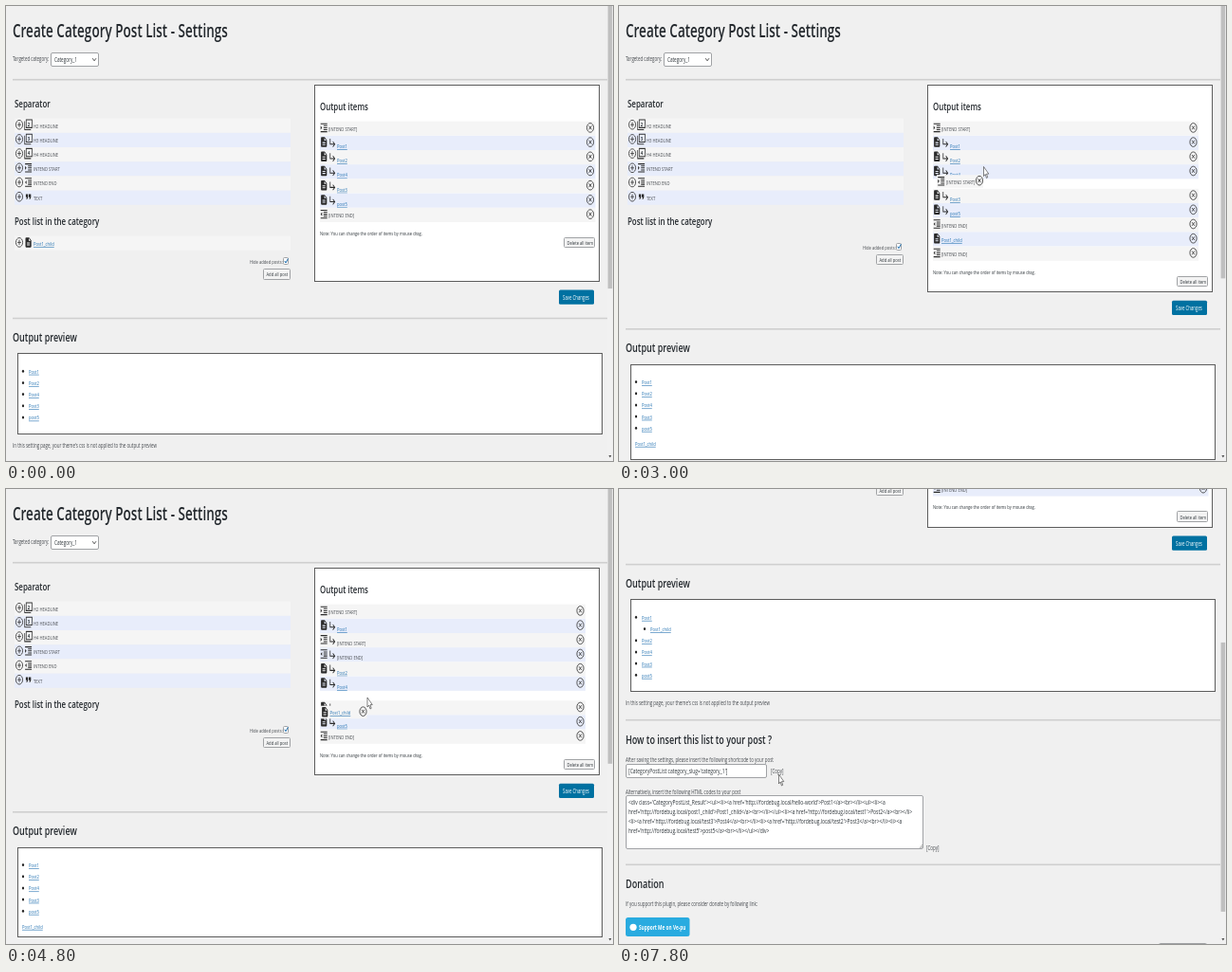
Recreate the animation shown at these times as an HTML page. Size 640x480 px, loop 8 s.

```html
<!DOCTYPE html>
<html lang="en">
<head>
<meta charset="utf-8">
<title>Settings</title>
<style>
html, body { margin: 0; width: 100%; height: 100%; overflow: hidden; background: #f0f0f0; }
svg { display: block; width: 640px; height: 480px; }
text { font-family: "Open Sans", "Noto Sans", sans-serif; fill: #464a4f; white-space: pre; }
.h { font-weight: 600; fill: #23282d; }
.a { fill: #2271b1; text-decoration: underline; }
.w { fill: #fff; }
.b { font-weight: 700; }
.d { fill: #2c3338; }
</style>
</head>
<body>
<svg id="stage" viewBox="0 0 640 480">
  <defs>
    <symbol id="in" viewBox="0 0 24 24" preserveAspectRatio="none"><path d="M3 21h18v-2H3zM3 8v8l4-4zM11 17h10v-2H11zM3 3v2h18V3zM11 9h10V7H11zM11 13h10v-2H11z"/></symbol>
    <symbol id="out" viewBox="0 0 24 24" preserveAspectRatio="none"><path d="M3 21h18v-2H3zM7 8v8l-4-4zM11 17h10v-2H11zM3 3v2h18V3zM11 9h10V7H11zM11 13h10v-2H11z"/></symbol>
    <symbol id="file" viewBox="0 0 24 24" preserveAspectRatio="none"><path fill-rule="evenodd" d="M14 2H6a2 2 0 0 0-2 2v16a2 2 0 0 0 2 2h12a2 2 0 0 0 2-2V8zM16 18H8v-2h8zM16 14H8v-2h8zM13 9V3.5L18.5 9z"/></symbol>
    <symbol id="quote" viewBox="0 0 24 24" preserveAspectRatio="none"><path d="M6 17h3l2-4V7H5v6h3zM14 17h3l2-4V7h-6v6h3z"/></symbol>
    <symbol id="sub" viewBox="0 0 24 24" preserveAspectRatio="none"><path d="M19 15l-6 6-1.4-1.4L15.2 16H4V4h2v10h9.2l-3.6-3.6L13 9z"/></symbol>
    <symbol id="pages" viewBox="0 0 24 24" preserveAspectRatio="none"><path fill="none" stroke="#333" stroke-width="2" d="M2 5v17h17M6 2h16v16H6z"/></symbol>
    <symbol id="plus" viewBox="0 0 24 24" preserveAspectRatio="none"><path fill="none" stroke="#333" stroke-width="1.8" d="M2.8 12a9.2 9.2 0 1 0 18.4 0a9.2 9.2 0 1 0-18.4 0M12 7v10M7 12h10"/></symbol>
    <symbol id="close" viewBox="0 0 24 24" preserveAspectRatio="none"><path fill="none" stroke="#333" stroke-width="1.8" d="M2.8 12a9.2 9.2 0 1 0 18.4 0a9.2 9.2 0 1 0-18.4 0M8.4 8.4l7.2 7.2M15.6 8.4l-7.2 7.2"/></symbol>
  </defs>
  <g id="page"></g>
  <g id="bar"></g>
  <g id="pointer"></g>
</svg>
<script>
const SQUEEZE = 0.69;   // the whole screen is narrowed sideways
const ROW = 15.2, STEP = 300, LOOP = 8000;
const SMALL = 6, BODY = 6.5, H1 = 19.6, H2 = 13.1, H3 = 11.5;
const FRAME = '#5c5c5c', EDGE = '#a0a2a5';
const S = '[INTEND START]', E = '[INTEND END]', CHILD = 'Post1_child';
const base = [S, 'Post1', 'Post2', 'Post4', 'Post3', 'post5', E];
const nested = inner => [S, 'Post1', S, ...inner, E, 'Post2', 'Post4', 'Post3', 'post5', E];
const lists = [
  base,
  [...base, CHILD],
  [...base, CHILD, S],
  [...base, CHILD, S, E],
  [S, 'Post1', S, ...base.slice(2), CHILD, E],
  [...nested([]), CHILD],
  nested([CHILD])
];

// pointer x, pointer y, list, scroll, dragged row, gap row
const steps = [
  [null, 0, 0],
  [190, 296, 0],
  [90, 262, 0],
  [14, 249, 0],
  [14, 249, 1],
  [50, 195, 1],
  [14, 170, 2],
  [153.5, 181.5, 2],
  [14, 185, 3],
  [362, 249, 3],
  [384.5, 169.5, 3, 0, 8, 4],
  [384.5, 148, 3, 0, 8, 2],
  [376, 264, 4],
  [378, 170, 4, 0, 9, 3],
  [376.5, 280, 5],
  [375, 265, 5],
  [381, 220, 5, 0, 9, 6],
  [383, 165, 5, 0, 9, 3],
  [392, 178, 6],
  [520, 268, 6],
  [604, 328, 6],
  [560, 322, 6],
  [367, 305, 6, 121],
  [362, 305, 6, 180],
  [330, 304, 6, 266],
  [240, 302, 6, 266],
  [168.5, 301, 6, 266]
];
const HAND_STEPS = [3, 4, 6, 8, 20];
const SAVE_STEP = 20;

const esc = s => s.replace(/&/g, '&amp;').replace(/</g, '&lt;');
const text = (x, y, s, size = SMALL, cls = '') =>
  `<text class="${cls}" font-size="${size}" transform="translate(${x} ${y}) scale(${SQUEEZE} 1)">${esc(s)}</text>`;
const rect = (x, y, w, h, fill, r = 0) =>
  `<rect x="${x}" y="${y}" width="${w}" height="${h}" fill="${fill}" rx="${r}"/>`;
// A bordered box whose one-pixel edges fall on whole pixels.
const snap = v => Math.ceil(v - 1) + 0.5;
const panel = (x, y, w, h, fill, line, r = 0) => {
  const x0 = snap(x), y0 = snap(y);
  return `<rect x="${x0}" y="${y0}" width="${snap(x + w) - x0}" height="${snap(y + h) - y0}" fill="${fill}" stroke="${line}" rx="${r}"/>`;
};
const icon = (id, x, y) =>
  `<use href="#${id}" x="${x - 4.65}" y="${y - 6.3}" width="9.3" height="12.6" fill="#2a2a2a"/>`;
const rule = y => rect(7, y - 0.8, 627, 1.6, '#cfcfcf');
const tint = i => i % 2 ? '#e8edfb' : '#f5f5f5';
const button = (x, y, w, s) => panel(x, y, w, 10.5, '#f3f3f3', EDGE, 1) + text(x + 3, y + 7.6, s, SMALL, 'd');
const isMark = s => s === S || s === E;
const iconOf = s => s === S ? 'in' : s === E ? 'out' : 'file';

function withDepth(list) {
  let d = 0;
  return list.map(s => {
    if (s === E) d = Math.max(0, d - 1);
    const item = { s, d };
    if (s === S) d++;
    return item;
  });
}

function leftColumn(hasChild) {
  let out = text(9, 107, 'Separator', H3, 'h');
  ['H2 HEADLINE', 'H3 HEADLINE', 'H4 HEADLINE', 'INTEND START', 'INTEND END', 'TEXT'].forEach((s, i) => {
    const y = 126 + ROW * i;
    out += rect(9, y - 7.4, 291, ROW, tint(i)) + icon('plus', 14, y - 0.8);
    out += icon(['pages', 'pages', 'pages', 'in', 'out', 'quote'][i], 23.6, y - 0.8);
    if (i < 3) out += text(22.8, y + 1, String(i + 2), SMALL, 'b d');
    out += text(29, y + 2.6, s);
  });
  out += text(9, 231.2, 'Post list in the category', H3, 'h');
  if (hasChild) {
    out += rect(9, 242.6, 291, ROW, tint(0)) + icon('plus', 14, 249.4) + icon('file', 23.6, 249.4);
    out += text(29, 252.8, CHILD, SMALL, 'a');
  }
  const y = hasChild ? 270 : 254.7;
  out += text(257, y + 2.2, 'Hide added posts:') + panel(293, y - 4.5, 5, 7, '#fff', EDGE, 1);
  out += `<path d="M293.8 ${y - 1}l1.2 2l2.4-4.6" fill="none" stroke="#2271b1"/>`;
  return out + button(271.5, y + 7.8, 28, 'Add all post');
}

function outputRows(list, drag, gap) {
  const dragging = drag !== undefined;
  const rows = withDepth(dragging ? list.filter((s, i) => i !== drag) : list);
  const right = dragging ? 611 : 621.5;
  return rows.map(({ s, d }, i) => {
    const y = 129 + ROW * i + (dragging && i >= gap ? 10.4 : 0);
    let out = rect(331, y - 7.4, right - 331, ROW, tint(i)) + icon(iconOf(s), 335.2, y - 0.6);
    for (let k = 0; k < d; k++) out += icon('sub', 344.5 + 9 * k, y);
    out += text(340 + 9 * d, y + (d ? 5.8 : 3), s, SMALL, isMark(s) ? '' : 'a');
    return out + icon('close', right - 5.5, y - 0.6);
  }).join('');
}

function preview(list, top) {
  const items = withDepth(list).filter(o => !isMark(o.s));
  let y = top + 18.4, out = '';
  items.forEach(({ s, d }, i) => {
    if (i) y += d ? 12.2 : 16;
    if (d) out += `<ellipse cx="${9 + 9 * d}" cy="${y}" rx="1.1" ry="1.5" fill="#222"/>`;
    out += text(d ? 15 + 9 * d : 17, y + 2.4, s, SMALL, 'a');
  });
  const flat = !items[items.length - 1].d;
  const bottom = y + (!flat ? 17.7 : isMark(list[list.length - 1]) ? 17.3 : 11.2);
  return { bottom, svg: panel(13, top, 616, bottom - top, '#fff', FRAME) + out };
}

const link = (path, name) => `href='http://fordebug.local/${path}'>${name}</a><br></li>`;
const code = [
  `<div class='CategoryPostList_Result'><ul><li><a ${link('hello-world', 'Post1')}<ul><li><a`,
  `${link('post1_child', CHILD)}</ul><li><a ${link('test1', 'Post2')}`,
  `<li><a ${link('test3', 'Post4')}<li><a ${link('test2', 'Post3')}<li><a`,
  `${link('test5', 'post5')}</ul></div>`
];

function footer(y) {
  let out = text(7, y + 13.8, "In this setting page, your theme's css is not applied to the output preview", BODY);
  out += rule(y + 29.7) + text(7, y + 54.5, 'How to insert this list to your post ?', H2, 'h');
  out += text(7, y + 74.2, 'After saving the settings, please insert the following shortcode to your post', BODY);
  out += panel(8, y + 76.7, 148, 14.2, '#fff', EDGE, 1.5);
  out += text(10, y + 86.3, "[CategoryPostList category_slug='category_1']", 7.2, 'd') + text(160, y + 86, '[Copy]', BODY);
  out += text(7, y + 107.8, 'Alternatively, insert the following HTML codes to your post', BODY);
  out += panel(8, y + 110, 313, 56, '#fff', EDGE, 1.5);
  code.forEach((s, i) => out += text(10, y + 119 + 10 * i, s, 7.2, 'd'));
  out += `<path d="M317 ${y + 165}l3-4M318.6 ${y + 165}l1.4-2" stroke="#777" stroke-width=".6"/>`;
  out += text(324, y + 166.8, '[Copy]', BODY) + rule(y + 182.3);
  out += text(7, y + 207, 'Donation', H2, 'h');
  out += text(7, y + 226.4, 'If you support this plugin, please consider donate by following link:', BODY);
  out += rect(7, y + 238, 67.5, 20, '#29abe0', 2.5);
  out += `<circle cx="15" cy="${y + 248.3}" r="3.6" fill="#fff"/>`;
  out += text(21, y + 251, 'Support Me on Ve-pu', 6.9, 'w b');
  return out + panel(570, y + 265.5, 50, 12, '#f3f3f3', EDGE, 1);
}

function pagePart(step) {
  const [px, py, li, scroll = 0, drag, gap] = steps[step];
  const list = lists[li], hasChild = li === 0;
  const dragging = drag !== undefined;
  const note = 133.2 + ROW * list.length - (dragging ? 4.8 : 0);
  const bottom = Math.max(hasChild ? 290.5 : 275.2, note + 21.4);

  let out = text(7, 33, 'Create Category Post List - Settings', H1, 'h');
  out += text(7, 58.4, 'Targeted category:', BODY);
  out += panel(48, 49.5, 50, 14, '#fff', EDGE, 1.5) + text(51, 59.2, 'Category_1', 6.7, 'd');
  out += '<path d="M91.2 55.2l1.9 2.6l1.9-2.6" fill="none" stroke="#444" stroke-width=".9"/>' + rule(77.7);
  out += leftColumn(hasChild);

  out += panel(326, 83.5, 299.5, bottom - 83.5, '#fff', FRAME) + text(331, 110.3, 'Output items', H3, 'h');
  out += outputRows(list, drag, gap);
  out += text(331, note + 2.2, 'Note: You can change the order of items by mouse drag.', SMALL, 'd');
  out += button(588.5, note + 4.8, 32, 'Delete all item');
  if (dragging) {
    const x = px - 49.5, y = py + 15.3, s = list[drag];
    out += rect(x, y - 6.6, 49, 13.6, tint(0)) + icon(iconOf(s), x + 4.7, y);
    out += text(x + 10, y + 2.8, s, SMALL, isMark(s) ? '' : 'a') + icon('close', x + 45, y - 0.6);
  }

  if (step === SAVE_STEP) out += panel(582.5, bottom + 8, 38, 17, '#fff', '#0071a1', 2);
  out += rect(583, bottom + 9, 37, 15.2, '#0071a1', 1.5) + text(587, bottom + 19, 'Save Changes', 6.3, 'w');
  out += rule(bottom + 39) + text(7, bottom + 63.6, 'Output preview', H2, 'h');
  const box = preview(list, bottom + 76.3);
  out += box.svg + footer(box.bottom);
  return { svg: `<g transform="translate(0 ${-scroll})">${out}</g>`, end: box.bottom, scroll };
}

function barPart(end, scroll) {
  const y = scroll ? 11.6 + 0.565 * scroll : 0;
  const h = scroll ? 284 : 298 - 0.4 * (end - 452);
  return rect(634, 0, 6, 480, '#f1f1f1') + rect(634.6, y, 4.6, h, '#c0c0c0') +
    '<path d="M635.4 474h3l-1.5 2.6z" fill="#505050"/>';
}

function pointerPart(step) {
  const [x, y] = steps[step];
  if (x === null) return '';
  const d = HAND_STEPS.includes(step)
    ? 'M0 1q1-1.4 1.6 0v3.6l2.6.8q.8.4.6 1.8l-.6 3.8h-4l-2.2-4q.4-1.2 2 .4z'
    : 'M0 0v10l1.7-2l1.3 4l1.2-.7l-1.2-3.7h2.3z';
  return `<path transform="translate(${x} ${y})" d="${d}" fill="#fff" stroke="#333" stroke-width=".6"/>`;
}

const el = id => document.getElementById(id);
let last = -1;
function frame() {
  const t = performance.now() % LOOP;
  const step = Math.min(steps.length - 1, Math.floor(t / STEP));
  if (step !== last) {
    last = step;
    const { svg, end, scroll } = pagePart(step);
    el('page').innerHTML = svg;
    el('bar').innerHTML = barPart(end, scroll);
    el('pointer').innerHTML = pointerPart(step);
  }
  requestAnimationFrame(frame);
}
frame();
</script>
</body>
</html>
```
